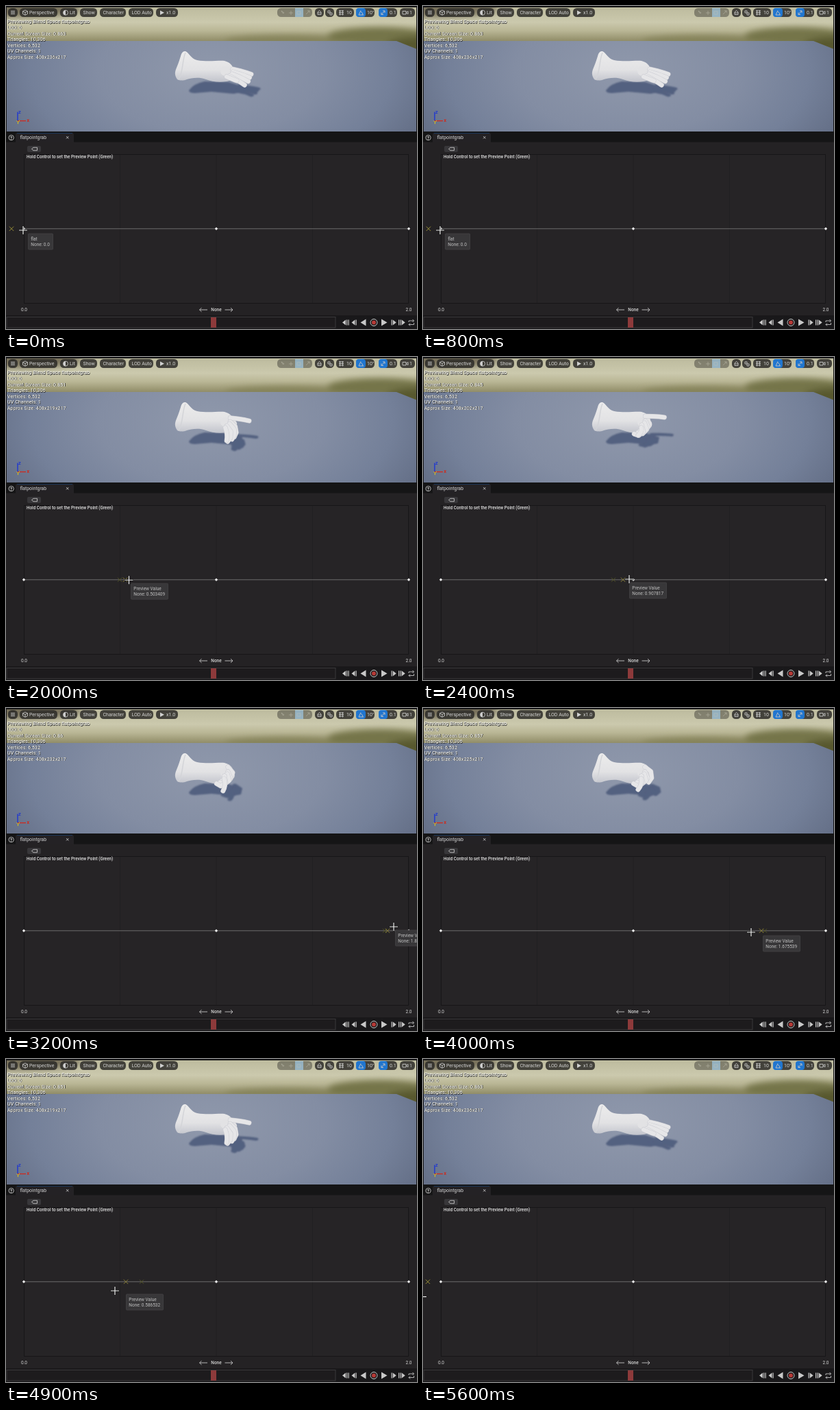
These frames come from a looping animation (600 by 471 pixels, 5.7 s). An HTML page:

```html
<!DOCTYPE html>
<html lang="en">
<head>
<meta charset="utf-8">
<title>Blend space preview</title>
<style>
html, body { margin: 0; width: 100%; height: 100%; overflow: hidden; background: #151515; }
svg { display: block; width: 100%; height: 100%; }
text { font: 7px Roboto, Arial, sans-serif; fill: #d4d4d4; white-space: pre; }
.stats text { font-size: 7.2px; font-weight: 500; fill: #e9e9e4; text-shadow: .6px .6px .5px #222; }
.finger { fill: none; stroke-linecap: round; stroke-linejoin: round; }
.icon { fill: none; stroke: #c4c4c4; stroke-width: .9; }
#tip text { font-size: 6.5px; fill: #c0c0c0; }
</style>
</head>
<body>
<svg viewBox="0 0 600 471" preserveAspectRatio="none">
  <defs>
    <linearGradient id="sky" x1="0" y1="0" x2="0" y2="1">
      <stop offset="0" stop-color="#bdbb9e"/><stop offset=".35" stop-color="#cbc9ad"/>
      <stop offset=".55" stop-color="#b9b695"/><stop offset=".8" stop-color="#8f8b66"/>
    </linearGradient>
    <radialGradient id="floor" gradientUnits="userSpaceOnUse" cx="300" cy="95" r="330" gradientTransform="matrix(1 0 0 .55 0 42.750)">
      <stop offset="0" stop-color="#8f98ab"/><stop offset=".5" stop-color="#838da3"/>
      <stop offset=".8" stop-color="#748099"/><stop offset="1" stop-color="#667189"/>
    </radialGradient>
    <linearGradient id="skin" x1="0" y1="0" x2="0" y2="1">
      <stop offset="0" stop-color="#ececec"/><stop offset=".6" stop-color="#e2e2e4"/><stop offset="1" stop-color="#c2c4cc"/>
    </linearGradient>
    <filter id="blur" x="-50%" y="-50%" width="200%" height="200%"><feGaussianBlur stdDeviation="5"/></filter>
    <filter id="soft" x="-20%" y="-20%" width="140%" height="140%"><feGaussianBlur stdDeviation=".9"/></filter>
    <clipPath id="view"><rect x="1" y="2" width="598" height="181"/></clipPath>
  </defs>
  <rect width="600" height="471" fill="#151516"/>

  <g clip-path="url(#view)">
    <rect y="2" width="600" height="62" fill="url(#sky)"/>
    <g filter="url(#blur)">
      <ellipse cx="20" cy="4" rx="90" ry="12" fill="#77705a"/>
      <ellipse cx="410" cy="52" rx="90" ry="9" fill="#85835a"/>
      <ellipse cx="545" cy="44" rx="75" ry="13" fill="#75754a"/>
      <ellipse cx="600" cy="58" rx="45" ry="13" fill="#58592f"/>
    </g>
    <path d="M0 51H570L600 63V184H0Z" fill="url(#floor)"/>
    <g filter="url(#soft)" opacity=".9">
      <path d="M267 123Q274 113 290 110L325 111 345 117 343 126 332 128 300 125 276 127Q267 127 267 123Z" fill="#4e5b7b"/>
      <g id="shadow" transform="matrix(1 0 0 .6 10 61)"></g>
    </g>
    <path d="M262 66C267 68 270 77 279 79C295 82 310 79 319 80C327 82 331 87 332 92C333 102 330 109 322 110C310 112 300 110 292 107C282 103 270 105 264 107C259 109 253 109 250 107C246 101 246 97 249 90C252 83 254 76 256 70C258 66 260 66 262 66Z" fill="url(#skin)"/>
    <path d="M262 68C257 79 259 96 252 107" fill="none" stroke="#d3d4d8" stroke-width="1.500"/>
    <g id="hand"></g>
    <g stroke-width="1.300" fill="none">
      <path d="M17 168V154.500" stroke="#1730d8"/><path d="M17 167.500H29" stroke="#d02a1c"/>
      <path d="M15.500 167L17.500 169.500 20 167M17.500 169V172" stroke="#d5c11f" stroke-width="1"/>
    </g>
    <text x="18" y="156.500" style="fill:#1730d8;font-weight:700;font-size:6px">Z</text>
    <text x="30.500" y="169.300" style="fill:#d02a1c;font-weight:700">x</text>
    <g class="stats" id="stats"></g>
    <g id="bar"></g>
  </g>

  <rect y="183" width="600" height="16" fill="#151516"/>
  <path d="M14 199V188Q14 185 17 185H96Q99 185 99 188V199Z" fill="#242225"/>
  <path d="M16 185.500H97" stroke="#193c66" stroke-width=".8"/>
  <circle cx="7.700" cy="192" r="3.700" class="icon"/>
  <text x="6" y="194.500" style="font-size:6.500px;font-weight:700">?</text>
  <text x="20.500" y="194" style="font-size:6.800px">flatpointgrab</text>
  <path d="M88 190l3.400 3.400m0-3.400l-3.400 3.400" class="icon"/>
  <rect y="198.500" width="600" height="253" fill="#242224"/>
  <rect x="31" y="204" width="20" height="9" rx="2" fill="#38373a"/>
  <path d="M37.500 208.500L40 206.300H45.500V210.700H40Z" class="icon"/>
  <rect x="26.500" y="216.500" width="561" height="217" fill="#262426" stroke="#171618"/>
  <path d="M166.500 217V433M307 217V433M447.500 217V433" stroke="#201f21"/>
  <text x="30" y="222.300" style="font-size:6.300px;font-weight:500;fill:#dedede">Hold Control to set the Preview Point (Green)</text>
  <path d="M26 324.800H588" stroke="#757475" stroke-width=".9"/>
  <path d="M26 322.600l2.200 2.200-2.200 2.200-2.200-2.200zM307 322.600l2.200 2.200-2.200 2.200-2.200-2.200zM588 322.600l2.200 2.200-2.200 2.200-2.200-2.200z" fill="#ececec"/>
  <text x="22" y="445.300" style="font-size:6.500px">0.0</text>
  <text x="583.500" y="445.300" style="font-size:6.500px">2.0</text>
  <text x="307" y="445.300" text-anchor="middle" style="font-size:6.500px;font-weight:500">None</text>
  <path d="M294 443H282.500l3-2.800m-3 2.800l3 2.800M319.500 443H331l-3-2.800m3 2.800l-3 2.800" class="icon"/>

  <rect y="451.500" width="600" height="20" fill="#19181a"/>
  <rect x="1" y="453.500" width="480" height="15.500" fill="#1d1b1d" stroke="#3b393b"/>
  <rect x="299" y="454" width="8" height="15" fill="#8d3a3b"/>
  <g id="transport" fill="#c8c8c8"></g>

  <g id="dimMark"><path d="M-3 -3L3 3M3 -3L-3 3" stroke="#565826" stroke-width=".9"/></g>
  <g id="mark"><path d="M-3.200 -3.200L3.200 3.200M3.200 -3.200L-3.200 3.200" stroke="#8f8438" stroke-width=".9"/></g>
  <g id="tip">
    <rect id="tipBox" x=".5" y=".5" height="23" rx="1" fill="#383739" stroke="#444346" stroke-width=".8"/>
    <text id="tipName" x="4.300" y="10"></text>
    <text id="tipValue" x="4.300" y="18"></text>
  </g>
  <g id="cursor" fill="none">
    <path d="M-6.500 0H6.500M0 -6.500V6.500" stroke="#161616" stroke-width="2.400"/>
    <path d="M-6 0H6M0 -6V6" stroke="#f0f0f0" stroke-width="1.200"/>
  </g>
</svg>
<script>
const $ = id => document.getElementById(id);
const LOOP = 5700, STEP = 100, ORIGIN = 26, UNIT = 281;

// time, cursor x, cursor y, marker x, trailing marker x, shown value, tooltip x
const MOVES = [
  [0, 25, 327, 8, 8, 0, 32],
  [1200, 25, 327, 8, 8, 0, 32],
  [1300, 27, 327, 26, 26, 0, 34],
  [1600, 58, 326.5, 56, 54, .099001, 63],
  [2400, 301, 324, 292, 278, .907817, 301],
  [3000, 538, 321, 527, 512, 1.762431, 540],
  [3200, 566, 319, 557, 553, 1.881274, 568],
  [3500, 588, 322, 587, 586, 1.995102, 594],
  [3700, 578, 325, 582, 584, 1.985316, 586],
  [4000, 479, 327, 494, 499, 1.675539, 496],
  [4200, 472, 329, 476, 480, 1.612874, 488],
  [4900, 159, 338, 175, 198, .586532, 175],
  [5300, 10, 345, 20, 40, .052417, 26],
  [5400, -1, 346, 7, 7, 0, 6],
  [5700, -1, 347, 7, 7, 0, 6]
];
// blend value, screen size, height
const SIZES = [[0, .863, 236], [.1, .861, 232], [.53, .851, 219], [.95, .845, 202],
  [1.67, .857, 225], [1.89, .86, 232], [2, .862, 235]];
// blend value, thumb tip
const THUMB = [[0, 337, 109], [.1, 338, 112], [.53, 322, 122], [.95, 314, 114], [1.67, 314, 119], [1.9, 317, 121]];

function sample(rows, at) {
  const i = rows.findIndex(row => row[0] > at);
  if (i < 0) return rows[rows.length - 1];
  if (i === 0) return rows[0];
  const a = rows[i - 1], b = rows[i], k = (at - a[0]) / (b[0] - a[0]);
  return a.map((n, j) => n + (b[j] - n) * k);
}

const clamp = (n, lo, hi) => Math.min(hi, Math.max(lo, n));

function fingerPath(x, y, angle, curl, scale = 1) {
  const lengths = [10, 9, 7], bends = [55, 120, 180];
  let d = `M${x} ${y}`;
  lengths.forEach((len, i) => {
    const a = (angle + i * 3 + curl * bends[i]) * Math.PI / 180;
    x += len * scale * Math.cos(a);
    y += len * scale * Math.sin(a);
    d += `L${x.toFixed(2)} ${y.toFixed(2)}`;
  });
  return d;
}

function handPaths(v) {
  const m = Math.min(v, 1), dx = -7 * m, grip = Math.max(0, v - 1);
  const [, tx, ty] = sample(THUMB, v);
  const curled = [[331, 96, 16], [330, 99, 22], [326, 102, 28]].map(([x, y, a]) =>
    fingerPath(x + dx, y - 3 * m, a - 4 * m, m));
  const index = fingerPath(331 + dx, 92 - 6 * m, 13 - 13 * m, grip, 1.08);
  const thumb = `M${322 + dx / 2} 103Q${(322 + tx) / 2 + 2} ${(103 + ty) / 2 + 1} ${tx} ${ty}`;
  return [index, ...curled, thumb];
}

const stroke = (d, color, width) => `<path class="finger" d="${d}" stroke="${color}" stroke-width="${width}"/>`;

function drawHand(v) {
  const paths = handPaths(v), dx = -7 * Math.min(v, 1);
  const palm = `M320 95L${334 + dx} 98`;
  $('hand').innerHTML = stroke(palm, '#e2e2e4', 14) +
    paths.map(d => stroke(d, '#cbccd2', 7) + stroke(d, '#e6e6e8', 6)).join('');
  $('shadow').innerHTML = [palm, ...paths].map(d => stroke(d, '#4e5b7b', 7)).join('');
}

function buildToolbar() {
  const pill = (x, end, label = '', labelX = x + 4) =>
    `<rect x="${x}" y="3" width="${end - x}" height="13" rx="5.5" fill="#2d2c29" fill-opacity=".85"/>
     <text x="${labelX}" y="12.2">${label}</text>`;
  const active = (x, w) => `<rect x="${x}" y="3" width="${w}" height="13" rx="4" fill="#2176cf"/>`;
  const icon = d => `<path class="icon" d="${d}"/>`;
  $('bar').innerHTML =
    pill(3, 17) + icon('M7 7.500H13M7 9.500H13M7 11.500H13') +
    pill(20, 75, 'Perspective', 34) + icon('M28 6L31.500 7.700V11.500L28 13.300 24.500 11.500V7.700ZM24.500 7.700L28 9.500 31.500 7.700M28 9.500V13') +
    pill(79, 104, 'Lit', 93) + '<circle cx="87" cy="9.700" r="3.500" class="icon"/><path d="M87 6.200a3.500 3.500 0 0 0 0 7z" fill="#ccc"/>' +
    pill(108, 133, 'Show', 112.5) + pill(137, 175, 'Character', 141.5) + pill(179, 215, 'LOD Auto', 183.5) +
    pill(219, 251, 'x1.0', 234) + '<path d="M225 6.500L231 9.700 225 13Z" fill="#d0d0d0"/>' +
    '<g opacity=".5">' + pill(396, 447) + '<rect x="422" y="3" width="12" height="13" fill="#6ba6de"/>' +
    '<g opacity=".5">' + icon('M402 7l4 3-2 .5zM416 7v6m-3-3h6M425 8h5v4h-5zM438 12l5-5m-3 0h3v3') + '</g></g>' +
    pill(451, 464) + icon('M455 12.500V9L457.500 6.500 460 9V12.500ZM455 10H460') +
    pill(466, 479) + icon('M470 7h3v3h-3zM473 10h3v3h-3z') +
    pill(482, 508, '10', 497) + icon('M486 7H493M486 9.500H493M486 12H493M487.500 6V13.500M491.500 6V13.500') +
    pill(511, 538, '10°', 527) + active(511, 14) + icon('M515 13L518 6.500M515 13H522M518 8q3 2 3 5') +
    pill(544, 571, '0.1', 560) + active(544, 13) + icon('M548 12.500L553 7M550 7H553V10M548 9.500V12.500H551') +
    pill(575, 597, '1', 589) + icon('M579 7.500H584V12H579ZM584 9.500L587 7.700V11.700L584 10');
}

function buildTransport() {
  const left = (x, w = 5, h = 4) => `M${x + w} ${461.5 - h}v${2 * h}L${x} 461.500Z`;
  const right = (x, w = 5, h = 4) => `M${x} ${461.5 - h}v${2 * h}L${x + w} 461.500Z`;
  const post = x => `M${x} 457.500h1.200v8h-1.200z`;
  $('transport').innerHTML = `<path d="${left(491)}${post(497)}${post(499.5)}
    ${left(504.5)}${post(510.5)}${left(517.5, 8, 5)}${right(548, 8.5, 5)}
    ${post(562.5)}${right(564.7)}${post(573)}${post(575.5)}${right(577.7)}"/>
    <circle cx="537" cy="461.500" r="5" fill="none" stroke="#c8c8c8"/><circle cx="537" cy="461.500" r="3" fill="#b63a37"/>
    <path class="icon" d="M588 461V459H595.500l-2-2m2 2l-2 2M595.500 462V464.500H588l2-2m-2 2l2 2"/>`;
}

function buildStats() {
  const lines = ['Previewing Blend Space flatpointgrab', 'LOD: 0', '', 'Triangles: 10,306', 'Vertices: 6,532', 'UV Channels: 1', ''];
  $('stats').innerHTML = lines.map((line, i) => `<text x="2" y="${25.3 + i * 8.6}">${line}</text>`).join('');
}

const place = (id, x, y) => $(id).setAttribute('transform', `translate(${x.toFixed(2)} ${y.toFixed(2)})`);

function draw(time) {
  const [, x, y, markX, dimX, value, tipX] = sample(MOVES, time);
  const blend = clamp((markX - ORIGIN) / UNIT, 0, 2);
  const [, size, height] = sample(SIZES, blend);
  const hovering = time <= 1200;

  drawHand(blend);
  const stats = $('stats').children;
  stats[2].textContent = 'Current Screen Size: ' + +size.toFixed(3);
  stats[6].textContent = `Approx Size: 408x${Math.round(height)}x217`;

  place('cursor', x, y);
  place('mark', markX, 324.8);
  place('dimMark', dimX, 324.8);
  place('tip', tipX, y + 4.5);
  $('tip').style.display = time <= 5300 ? '' : 'none';
  $('tipBox').setAttribute('width', hovering ? 36 : 54);
  $('tipName').textContent = hovering ? 'flat' : 'Preview Value';
  $('tipValue').textContent = 'None: ' + (value ? value.toFixed(6) : '0.0');
}

buildToolbar();
buildTransport();
buildStats();

const start = performance.now();
function tick() {
  const time = (performance.now() - start) % LOOP;
  draw(Math.floor(time / STEP) * STEP);
  requestAnimationFrame(tick);
}
tick();
</script>
</body>
</html>
```
